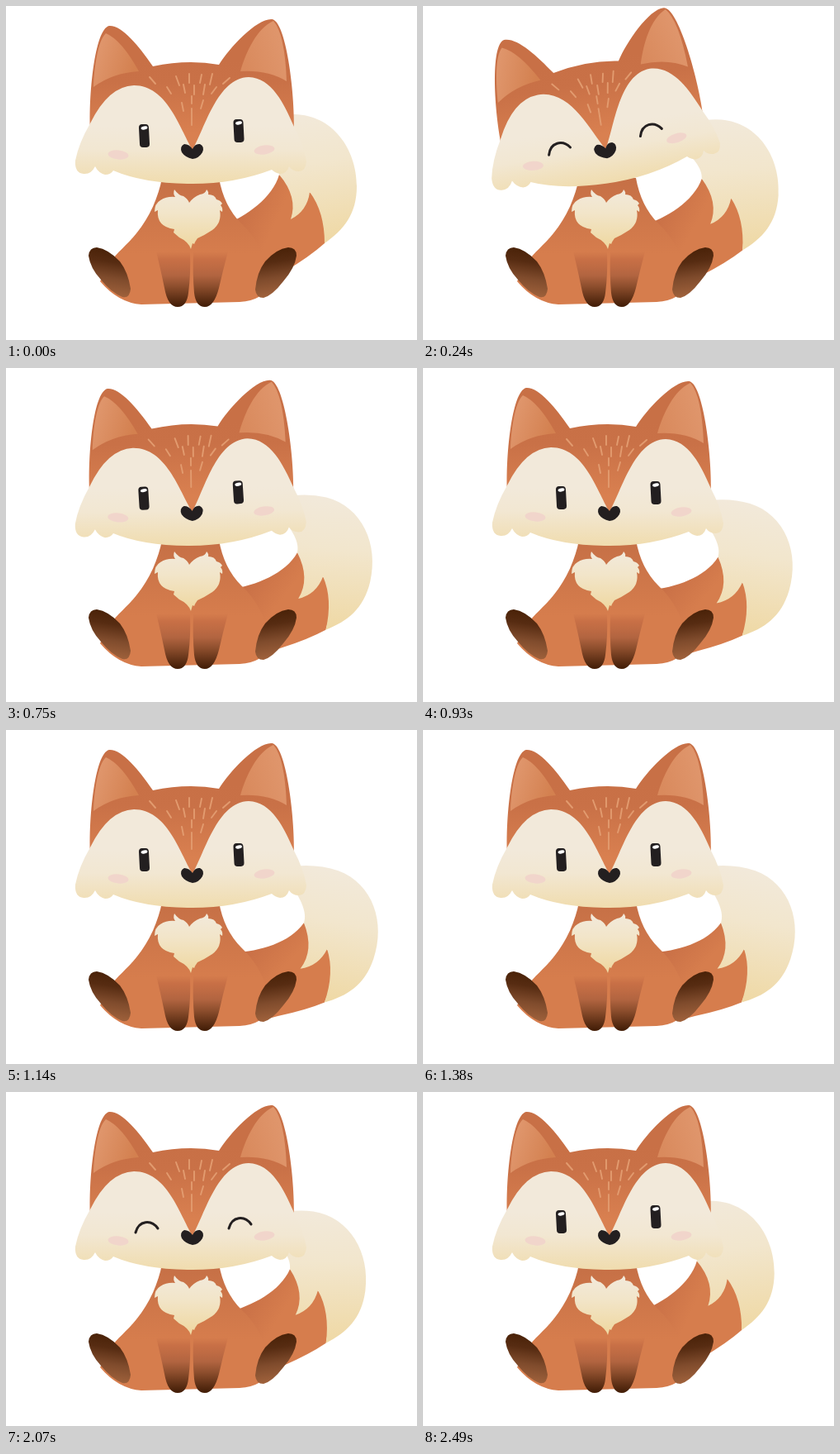
These frames come from a looping animation (498x404 px, 2.52 s). An HTML page with a canvas:

```html
<!DOCTYPE html>
<html lang="en">
<head>
<meta charset="utf-8">
<title>Fox</title>
<style>
html, body { margin: 0; width: 100%; height: 100%; overflow: hidden; background: #fff; }
canvas { display: block; }
</style>
</head>
<body>
<canvas id="stage" width="498" height="404"></canvas>
<script>
const ctx = document.getElementById('stage').getContext('2d');
const LOOP = 2520;
const FRAME = 30;
const INK = '#231f20';

const shape = d => new Path2D(d);

function gradient(x0, y0, x1, y1, ...stops) {
  const g = ctx.createLinearGradient(x0, y0, x1, y1);
  stops.forEach(([at, color]) => g.addColorStop(at, color));
  return g;
}

function fill(path, style) {
  ctx.fillStyle = style;
  ctx.fill(path);
}

function rotated(x, y, degrees, draw) {
  ctx.save();
  ctx.translate(x, y);
  ctx.rotate(degrees * Math.PI / 180);
  ctx.translate(-x, -y);
  draw();
  ctx.restore();
}

const paths = {
  tail: shape('M262 266C292 254 323 232 331 204L346 215L388 235L386 287Q368 303 338 321Q305 345 265 350Z'),
  tailTip: shape('M300 142Q325 131 350 131C395 132 425 172 425 218C425 252 409 271 386 287Q386 249 368 225Q365 248 345 258Q354 231 331 204C331 194 324 182 300 165Z'),
  body: shape('M189 208C185 230 174 256 158 275C147 289 134 298 126 311L114 333Q136 359 164 361L283 358Q298 357 306 352L320 331Q314 290 285 263Q264 242 258 208Z'),
  chest: shape('M180 249Q180 239 187 235Q195 230 205 231Q202 227 204 222Q209 229 215 230Q220 233 222 238Q227 231 235 228Q242 227 243 222Q246 225 245 228Q253 228 255 234Q260 235 262 239L260 241Q263 244 262 249L259 247Q262 262 250 271Q241 277 232 281Q229 285 228 288L226 287L224 294Q221 285 210 280L203 274L204 270Q182 267 184 247Z'),
  leftPaw: shape('M182 297Q187 317 192 341Q196 364 208 364Q219 364 221 347Q224 324 223 297Z'),
  rightPaw: shape('M269 297Q263 319 258 341Q252 364 241 364Q230 364 228 347Q226 324 227 297Z'),
  leftFoot: shape('M100 302Q101 292 110 292Q124 294 138 309Q148 322 151 342Q150 354 141 352Q128 347 115 331Q102 317 100 302Z'),
  rightFoot: shape('M352 302Q352 292 342 292Q327 294 314 309Q304 322 302 343Q303 353 312 353Q323 350 336 333Q350 317 352 302Z'),
  fur: shape('M102 150C100 110 107 28 125 24C140 23 160 47 178 73Q220 64 258 71C271 50 304 15 322 16C339 17 350 103 349 150L300 190H150Z'),
  leftEar: shape('M121 33C111 42 107 75 106 98Q129 81 161 79Q140 41 121 33Z'),
  rightEar: shape('M324 18C304 27 291 55 284 79Q317 77 340 91Q338 34 324 18Z'),
  face: shape('M102 142Q124 97 155 96C195 96 210 147 226 174C241 148 256 87 294 86C322 87 337 118 349 146Q361 169 364 188Q363 200 355 200Q347 200 343 194Q340 203 332 203Q326 202 322 198Q275 216 220 215Q165 214 130 199Q127 204 120 204Q112 202 108 194Q103 204 94 203Q83 202 84 187Q88 166 102 142Z'),
  nose: shape('M226 173Q229 166 235 167Q241 170 238 177Q234 184 226 185Q217 183 213 177Q210 170 216 167Q222 167 226 173Z')
};

// Each hair: start x, start y, dx, dy.
const hairs = [
  [174, 86, 7, 8], [195, 98, 5, 8], [206, 85, 4, 11], [215, 95, 2, 10],
  [222, 82, 0, 11], [237, 83, -2, 10], [250, 82, -3, 13], [228, 96, 0, 11],
  [241, 95, -2, 12], [255, 98, -6, 8], [271, 87, -8, 7], [213, 117, 2, 10],
  [225, 109, 0, 9], [239, 114, -3, 10], [225, 124, 0, 20]
];

function drawTail() {
  fill(paths.tail, gradient(275, 255, 350, 290, [0, '#c86f46'], [.6, '#d67d4d']));
  fill(paths.tailTip, gradient(345, 131, 370, 285, [0, '#f2e9da'], [.4, '#f2e6cd'], [1, '#efd9a6']));
}

function drawBody() {
  fill(paths.body, gradient(0, 212, 0, 300, [0, '#c67046'], [1, '#d67d4d']));
  fill(paths.chest, gradient(0, 224, 0, 290, [0, '#f2e9da'], [.4, '#f2e5c9'], [1, '#efd8a2']));
  const paw = gradient(0, 297, 0, 362,
    [0, 'rgba(196,108,68,0)'], [.15, 'rgba(196,108,68,.8)'], [.45, '#b16440'], [.65, '#8d4e2d'], [1, '#462009']);
  fill(paths.leftPaw, paw);
  fill(paths.rightPaw, paw);
  const foot = [[0, '#4b2309'], [.25, '#572c12'], [.6, '#7f4b2c'], [1, '#a0623c']];
  fill(paths.leftFoot, gradient(128, 296, 120, 350, ...foot));
  fill(paths.rightFoot, gradient(324, 296, 332, 350, ...foot));
}

function drawBlush(x, y, tilt) {
  rotated(x, y, tilt, () => {
    ctx.fillStyle = '#f1d5cb';
    ctx.beginPath();
    ctx.ellipse(x, y, 12.5, 5.5, 0, 0, Math.PI * 2);
    ctx.fill();
  });
}

function drawOpenEye(x, y) {
  rotated(x, y, -3, () => {
    ctx.fillStyle = INK;
    ctx.beginPath();
    ctx.roundRect(x - 6, y - 14, 12, 28, 4);
    ctx.fill();
    ctx.fillStyle = '#fff';
    ctx.beginPath();
    ctx.ellipse(x + .5, y - 9.5, 4, 2, -.15, 0, Math.PI * 2);
    ctx.fill();
  });
}

function drawClosedEye(x, y) {
  ctx.strokeStyle = INK;
  ctx.lineWidth = 3;
  ctx.beginPath();
  ctx.moveTo(x - 13, y + 12);
  ctx.bezierCurveTo(x - 9, y - 3, x + 6, y - 4, x + 14, y + 7);
  ctx.stroke();
}

function drawHead(eyesClosed) {
  fill(paths.fur, gradient(0, 65, 0, 155, [0, '#c87046'], [.3, '#c97147'], [1, '#d98050']));
  fill(paths.leftEar, gradient(110, 65, 155, 80, [0, '#df956b'], [1, '#d3804f']));
  fill(paths.rightEar, gradient(290, 75, 337, 60, [0, '#d98a5d'], [1, '#df956b']));

  ctx.lineCap = 'round';
  ctx.strokeStyle = '#e29b6f';
  ctx.lineWidth = 1.9;
  ctx.beginPath();
  hairs.forEach(([x, y, dx, dy]) => {
    ctx.moveTo(x, y);
    ctx.lineTo(x + dx, y + dy);
  });
  ctx.stroke();

  fill(paths.face, gradient(0, 145, 0, 215, [0, '#f2e9da'], [.4, '#f2e7d2'], [1, '#f0dcae']));
  drawBlush(136, 180, 6);
  drawBlush(313, 174, -8);
  fill(paths.nose, INK);

  if (eyesClosed) {
    drawClosedEye(170, 158);
    drawClosedEye(283, 153);
  } else {
    drawOpenEye(167.5, 157);
    drawOpenEye(282, 151);
  }
}

function ramp(t, from, to) {
  const u = Math.min(1, Math.max(0, (t - from) / (to - from)));
  return u * u * (3 - 2 * u);
}

function tailAngle(t) {
  const u = 1 - Math.abs(1 - 2 * t / LOOP);
  return 19.5 * (u + u ** 3 - u ** 4);
}

function render(t) {
  ctx.fillStyle = '#fff';
  ctx.fillRect(0, 0, 498, 404);
  const tilt = -9 * (ramp(t, 60, 210) - ramp(t, 600, 780));
  const eyesClosed = (t >= 150 && t < 360) || (t >= 1950 && t < 2160);
  rotated(259, 308, tailAngle(t), drawTail);
  drawBody();
  rotated(219.5, 203, tilt, () => drawHead(eyesClosed));
}

const start = performance.now();

function tick() {
  const t = (performance.now() - start) % LOOP;
  render(Math.floor(t / FRAME) * FRAME);
  requestAnimationFrame(tick);
}

tick();
</script>
</body>
</html>
```
